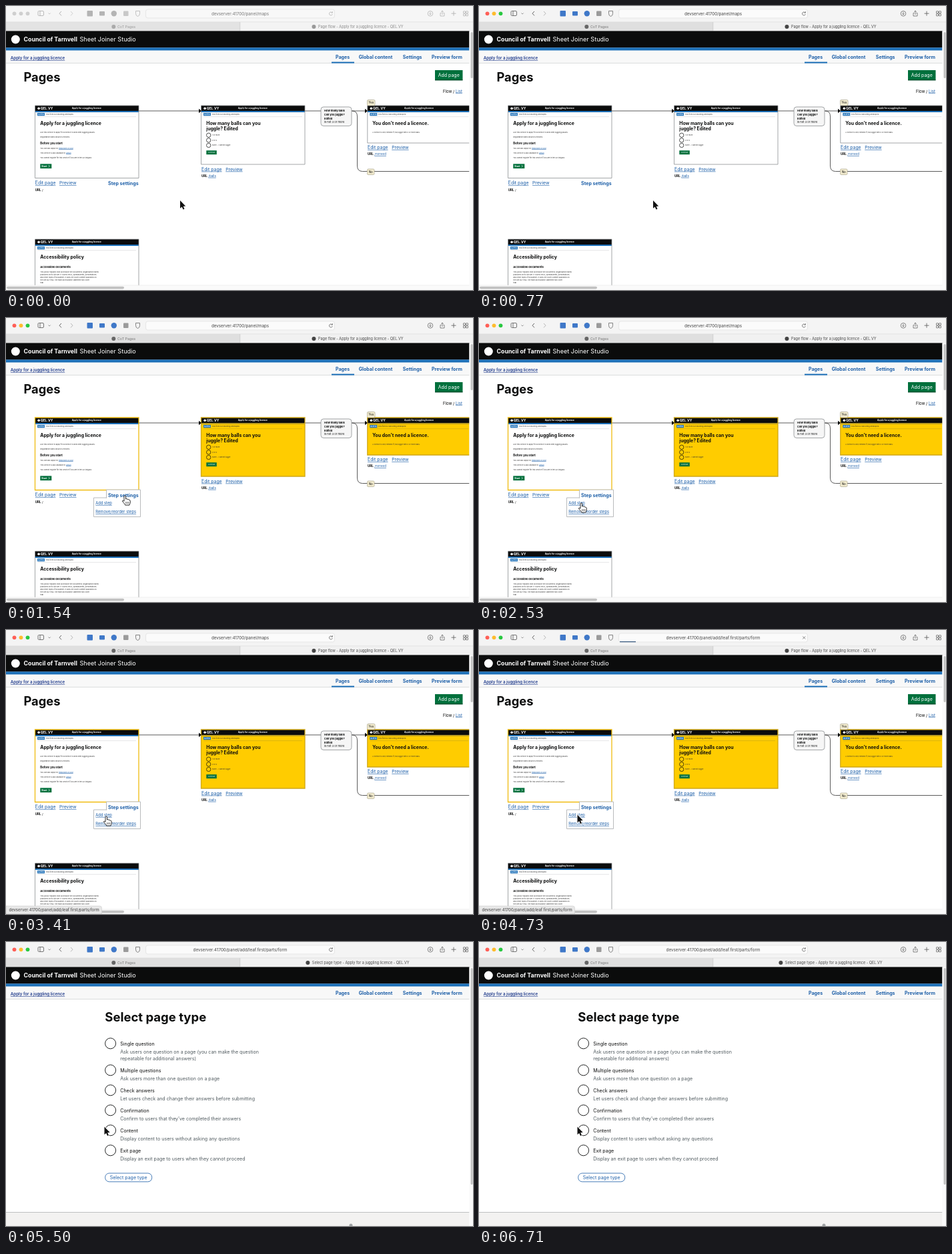
Write an HTML page with a canvas that moves like this. It is 700x425 px and loops after 8 s.

```html
<!DOCTYPE html>
<html lang="en">
<head>
<meta charset="utf-8">
<title>Page flow</title>
<style>
html, body { margin: 0; width: 100%; height: 100%; overflow: hidden; background: #fff; }
canvas { display: block; width: 700px; height: 425px; }
</style>
</head>
<body>
<canvas id="stage"></canvas>
<script>
const W = 700, H = 425, LOOP = 8000, STEP = 110, LAST = 6710;
const canvas = document.getElementById('stage');
const ratio = window.devicePixelRatio || 1;
canvas.width = W * ratio;
canvas.height = H * ratio;
const c = canvas.getContext('2d');

const INK = '#0b0c0c', LINK = '#1d5fa8', BLUE = '#1d70b8', GREEN = '#00703c',
      GOLD = '#ffcc00', GREY = '#505a5f', EDGE = '#b1b4b6';
const SERVICE = 'Apply for a juggling licence', BRAND = 'QEL.VY';
const HOST = 'devserver:41700/panel/';
const FLOW_URL = HOST + 'maps', EDIT_URL = HOST + 'add/leaf.first/parts/form';

// Event times in ms
const AT = { focus: 660, hand: 1540, menu: 1540, status: 2640, load: 4400,
             page: 4840, title: 4950, loaded: 5060, barGone: 5280, statusGone: 5500 };

// Pointer path: time, x, y
const POINTER = [
  [0, 261, 291], [990, 261, 291], [1320, 200.5, 268], [1540, 178, 266],
  [1980, 178, 266], [2310, 158, 275], [2530, 153, 277], [2750, 150, 279],
  [3410, 150, 279], [4180, 148, 277], [4290, 147.5, 276.5]
];
// Loading bar: time, right end
const PROGRESS = [[4400, 212], [4730, 235], [4840, 322], [4950, 400], [5060, 491]];

function along(keys, t, i) {
  const n = keys.findIndex(k => k[0] > t);
  if (n < 0) return keys[keys.length - 1][i];
  if (n === 0) return keys[0][i];
  const a = keys[n - 1], b = keys[n];
  return a[i] + (b[i] - a[i]) * (t - a[0]) / (b[0] - a[0]);
}

function rect(x, y, w, h, fill) {
  c.fillStyle = fill;
  c.fillRect(x, y, w, h);
}

function box(x, y, w, h, r, fill, stroke, line = 1) {
  c.beginPath();
  c.roundRect(x, y, w, h, r);
  if (fill) { c.fillStyle = fill; c.fill(); }
  if (stroke) { c.strokeStyle = stroke; c.lineWidth = line; c.stroke(); }
}

function dot(x, y, r, fill, stroke, line = 1) {
  box(x - r, y - r, r * 2, r * 2, r, fill, stroke, line);
}

function path(d, stroke, line = 1) {
  c.strokeStyle = stroke;
  c.lineWidth = line;
  c.stroke(new Path2D(d));
}

// y is the middle of the capitals; returns the width
function text(s, x, y, size, color = INK, weight = 400, align = 'left') {
  c.font = `${weight} ${size}px Inter, sans-serif`;
  c.textAlign = align;
  c.fillStyle = color;
  c.fillText(s, x, y + size * 0.36);
  return c.measureText(s).width;
}

function link(s, x, y, size, weight = 400, color = LINK) {
  const w = text(s, x, y, size, color, weight);
  rect(x, y + size * 0.5, w, 0.6, color);
  return w;
}

function toolbar(t) {
  const on = t >= AT.focus;
  const icon = on ? '#686868' : '#b4b4b4';
  const blue = on ? '#3f78c8' : '#b4b4b4';
  rect(0, 0, W, 24, on ? '#f4f4f4' : '#f6f6f6');
  ['#ff5f57', '#febc2e', '#28c840'].forEach((col, i) =>
    dot(12.5 + i * 10, 11.3, 2.9, on ? col : '#cfcfcf'));

  box(48, 7.5, 8.5, 7, 1.5, null, icon, 0.9);
  path('M51 7.5v7', icon, 0.9);
  path('M63.5 10.5l1.6 1.6 1.6-1.6', icon, 0.7);
  path('M83 8l-3 3.2 3 3.2', icon);
  path('M97 8l3 3.2-3 3.2', on ? '#b8b8b8' : '#d0d0d0');

  box(121.5, 7, 8.5, 8.5, 1, blue);
  box(140, 8, 8, 6.5, 1, blue);
  dot(161.8, 11.3, 4.2, blue);
  box(176, 7.5, 7.5, 7.5, 1, on ? '#9a9a9a' : '#c8c8c8');
  path('M194.5 7.5h6v4q0 3-3 4q-3-1-3-4z', icon, 0.8);

  box(209.5, 5, 283, 13, 3, on ? '#fbfbfb' : '#f8f8f8', '#dedede', 0.7);
  text(t < AT.load ? FLOW_URL : EDIT_URL, 351, 11.7, 6.25, on ? '#444' : '#777', 400, 'center');
  if (t >= AT.load && t < AT.loaded) {
    path('M485.2 9.5l4 4m0-4l-4 4', '#666', 0.8);
  } else {
    path('M489 10a2.5 2.5 0 1 0 .4 2.2M489.4 8.2v2h-2', icon, 0.8);
  }
  if (t >= AT.load && t < AT.barGone) {
    rect(211, 17, along(PROGRESS, t, 1) - 211, 1.2, '#34557c');
  }

  dot(636, 11.3, 3.8, null, icon, 0.8);
  path('M636 9v4m-1.6-1.6l1.6 1.6 1.6-1.6', icon, 0.8);
  path('M652.5 10.5h-1.5v4.5h6v-4.5h-1.5M654 13V7m-1.7 1.7L654 7l1.7 1.7', icon, 0.8);
  path('M667.5 11.2h7M671 7.7v7', icon, 0.9);
  for (const x of [685.5, 689.5]) for (const y of [7.8, 11.8]) box(x, y, 3, 3, 0.4, null, icon, 0.8);

  rect(0, 24, W, 14, on ? '#f1f1f1' : '#f3f3f3');
  rect(0, 24, 351, 13.5, on ? '#dfdfdf' : '#e3e3e3');
  rect(0, 23.6, W, 0.6, '#d8d8d8');
  rect(350.5, 24, 0.7, 13, '#cacaca');
  const ink = on ? '#484848' : '#8a8a8a';
  dot(161.3, 31, 3, on ? '#666' : '#aaa');
  text('CoT Pages', 167, 31, 5.3, on ? '#777' : '#999');
  const tail = ` - ${SERVICE} - ${BRAND}`;
  const title = t < AT.page ? 'Page flow' + tail : t < AT.title ? EDIT_URL : 'Select page type' + tail;
  const w = text(title, 531.7, 31, 5.5, ink, 400, 'center');
  dot(531.7 - w / 2 - 6.5, 31, 3, on ? '#444' : '#999');
}

function banner(onFlow) {
  rect(0, 37.4, 694.5, 25, INK);
  rect(0, 62.3, 694.5, 4.4, BLUE);
  dot(14.3, 50, 6.5, '#fff');
  text('Council of Tarnvell', 26.5, 50, 8.8, '#fff', 700);
  text('Sheet Joiner Studio', 110.5, 50, 9.1, '#fff');
  rect(0, 66.7, 694.5, 18.6, '#f8f8f8');
  rect(0, 85, 694.5, 0.8, '#d4d6d8');
  link(SERVICE, 6.8, 78, 6.2, 600, '#203c8c');
  [['Pages', 494], ['Global content', 528.7], ['Settings', 594.8], ['Preview form', 638]]
    .forEach(([s, x]) => text(s, x, 76, 7.1, LINK, 700));
  if (onFlow) rect(488, 83.6, 34, 2, BLUE);
}

function thumb(x, y, h, gold, outline) {
  const w = 155.5;
  rect(x, y, w, h, gold ? GOLD : '#fff');
  rect(x, y, w, 8, INK);
  rect(x, y + 8, w, 2, gold ? '#b99b20' : BLUE);
  dot(x + 5.6, y + 4.2, 1.8, '#fff');
  text(BRAND, x + 8.2, y + 4.2, 5, '#fff', 700);
  text(SERVICE, x + 55.3, y + 4.2, 3.3, '#fff', 700);
  rect(x + 3.5, y + 11, 11, 4.2, BLUE);
  text('ALPHA', x + 9, y + 13.1, 2.7, '#fff', 700, 'center');
  text('This form is now being developed', x + 16, y + 13.1, 2.6, '#333');
  rect(x + 4, y + 16.6, w - 8, 0.5, gold ? '#b99b20' : '#c8cacc');
  box(x, y, w, h, 0, null, outline ? '#f0bc10' : gold ? '#d0a818' : '#8d9194', outline || gold ? 1.3 : 0.8);
}

const heading = (s, x, y) => text(s, x, y, 6.9, INK, 700);
const small = (s, x, y) => text(s, x, y, 2.6, '#333');

function caption(x, y, url) {
  link('Edit page', x, y, 6.9);
  link('Preview', x + 36.2, y, 6.8);
  const w = text('URL', x, y + 10.3, 4.5, INK, 700);
  if (url) link(url, x + w + 1.5, y + 10.3, 4.5);
  else text('/', x + w + 1.5, y + 10.3, 4.5);
}

function arrowHead(x, y) {
  c.fillStyle = INK;
  c.fill(new Path2D(`M${x} ${y}l-4-3.2v6.4z`));
}

function tag(s, y, w) {
  box(541.5, y, w, 8.4, 1.5, '#f6efd2', '#a8a28c', 0.7);
  text(s, 541.5 + w / 2, y + 4.2, 4.6, INK, 400, 'center');
}

function startThumb(lit) {
  const x = 51.3;
  thumb(43.5, 149, 108.5, false, lit);
  heading(SERVICE, x, 176);
  small('Use this service to apply for a licence to work with juggling passes.', x, 189.3);
  small('Registration takes around 5 minutes.', x, 196.3);
  text('Before you start', x, 205, 4.3, INK, 700);
  link('telephone or post', x + 1 + small('You can also apply by', x, 213), 213, 2.6);
  link('Welsh', x + 1 + small('This service is also available in', x, 220), 220, 2.6);
  small('You cannot register for this service if you are in the UK illegally.', x, 227);
  rect(x, 236.3, 17, 6.8, GREEN);
  text('Start', 53.3, 239.6, 3.4, '#fff', 700);
  path('M63.8 238l1.5 1.7-1.5 1.7', '#fff', 0.7);
  caption(43.8, 265, '');
}

function flowPage(t) {
  const lit = t >= AT.menu;
  c.save();
  c.beginPath();
  c.rect(0, 38, 694.5, 380);
  c.clip();
  text('Pages', 26.5, 106, 18.3, INK, 700);
  rect(643, 96, 41.5, 15.2, GREEN);
  rect(643, 110.4, 41.5, 0.9, '#003d21');
  text('Add page', 663.7, 103.5, 7, '#fff', 400, 'center');
  const w = text('Flow / ', 655, 127.5, 6);
  link('List', 655 + w, 127.5, 6);

  path('M199 157H290M448 157H472M518 157H538M518.5 157Q526.5 157 526.5 165V239Q526.5 247.5 534.5 247.5H695', '#333', 0.8);
  startThumb(lit);

  thumb(292.5, 149, 88, lit);
  heading('How many balls can you', 300.3, 176);
  heading('juggle? Edited', 300.3, 184);
  ['1 or more', '2 or 3', 'None - I cannot juggle'].forEach((s, i) => {
    const y = 193.3 + i * 7.6;
    dot(303.7, y, 3.2, lit ? null : '#fff', INK, 0.7);
    small(s, 309, y);
  });
  rect(300.3, 216.2, 15.5, 6, GREEN);
  text('Continue', 308, 219.1, 2.5, '#fff', 400, 'center');
  caption(293, 244.2, '/balls');

  box(472, 151, 46, 28.5, 4, '#f6f6f6', '#8d9194', 0.8);
  ['How many balls', 'can you juggle?', 'Edited'].forEach((s, i) =>
    text(s, 477, 157 + i * 5.7, 4, INK, 700));
  text('is not 3 or more', 477, 174, 4.1);

  thumb(541.8, 149, 56, lit);
  heading("You don't need a licence.", 549.3, 176);
  small('A licence is only needed if you juggle with 3 or more balls.', 549.3, 189.3);
  caption(542, 211.5, '/noneed');
  arrowHead(293, 157);
  arrowHead(542, 157);
  tag('Yes', 140.5, 11.5);
  tag('No', 244, 10.5);

  thumb(43.5, 349, 108, false);
  heading('Accessibility policy', 51.3, 376);
  text('Accessible documents', 51.3, 390.3, 4.1, INK, 700);
  ['This policy explains how accessible the documents (organisation name)',
   'publishes on its site are. It covers PDFs, spreadsheets, presentations',
   'and other types of document. It does not cover content published on',
   'the site as HTML: the main accessibility statement will cover',
   'that.'].forEach((s, i) => small(s, 51.3, 398.3 + i * 4));

  if (lit) {
    box(131.5, 269, 70, 28.5, 0, '#fff', EDGE, 0.9);
    box(150.5, 257, 51, 12.3, 0, '#fff', EDGE, 0.9);
    rect(151, 268, 50, 2, '#fff');
    link('Add step', 134.3, 277, 5.8);
    link('Remove/reorder steps', 134.3, 290, 5.8);
  }
  text('Step settings', 153, 265, 7.1, LINK, 700);
  c.restore();

  rect(0, 418, W, 7, '#fafafa');
  rect(0, 417.7, W, 0.6, '#e4e4e4');
  box(1, 419.8, 176, 3.6, 1.8, '#c1c1c1');
}

const OPTIONS = [
  [152, 'Single question', 'Ask users one question on a page (you can make the question', 'repeatable for additional answers)'],
  [192, 'Multiple questions', 'Ask users more than one question on a page'],
  [222, 'Check answers', 'Let users check and change their answers before submitting'],
  [252, 'Confirmation', 'Confirm to users that they’ve completed their answers'],
  [282, 'Content', 'Display content to users without asking any questions'],
  [312, 'Exit page', 'Display an exit page to users when they cannot proceed']
];

function typePage() {
  text('Select page type', 148.3, 112.5, 18.5, INK, 700);
  for (const [y, name, ...hints] of OPTIONS) {
    dot(156.6, y - 0.2, 8, '#fff', INK, 0.9);
    text(name, 171.2, y + 0.2, 7.1);
    hints.forEach((s, i) => text(s, 171.2, y + 12.4 + i * 10, 7.07, GREY));
  }
  box(148.7, 346, 70, 12.8, 6, '#fff', LINK, 0.8);
  text('Select page type', 183.7, 352.6, 7, LINK, 400, 'center');
  rect(0, 404, 694.5, 21, '#f3f2f1');
  rect(0, 404, 694.5, 0.8, EDGE);
  dot(517, 424, 2.5, '#a0a3a5');
}

function status() {
  box(0, 413, 143.5, 12, [0, 3, 0, 0], '#e7e7e7', '#cfcfcf', 0.6);
  text(EDIT_URL, 4.5, 418.8, 5.9, '#555', 500);
}

const ARROW = new Path2D('M0 0V11.8L2.7 9.4 4.5 13.6 6.5 12.7 4.7 8.7 8.2 8.4Z');
const HAND = new Path2D('M-1 1.2C-1-.6 1.6-.6 1.6 1.2V5C2.5 4.2 4 4.5 4.2 5.6 5 5 6.2 5.3 6.4 6.3' +
  ' 7.4 6 8.2 6.6 8.2 7.6V10C8.2 12 7 12.6 7 14H.6C.4 12-3 9.6-3.6 8-3.6 7-2.2 6.8-1 8.2Z');

function pointer(t) {
  const hand = t >= AT.hand && t < AT.load;
  c.save();
  c.translate(along(POINTER, t, 1), along(POINTER, t, 2));
  c.lineJoin = 'round';
  c.strokeStyle = hand ? '#111' : '#fff';
  c.lineWidth = hand ? 0.9 : 1.5;
  c.fillStyle = hand ? '#fff' : '#111';
  if (hand) {
    c.fill(HAND);
    c.stroke(HAND);
    path('M1.7 9v3M3.7 9v3M5.7 9v3', '#111', 0.6);
  } else {
    c.stroke(ARROW);
    c.fill(ARROW);
  }
  c.restore();
}

function draw(t) {
  const onFlow = t < AT.page;
  c.setTransform(ratio, 0, 0, ratio, 0, 0);
  rect(0, 0, W, H, '#fff');
  toolbar(t);
  banner(onFlow);
  if (onFlow) flowPage(t);
  else typePage();
  rect(694.5, 38, 5.5, 387, '#fafafa');
  box(696.6, 39, 3, onFlow ? 69 : 324, 1.5, '#c1c1c1');
  if (t >= AT.status && t < AT.statusGone) status();
  pointer(t);
}

function tick() {
  const t = performance.now() % LOOP;
  draw(Math.min(Math.floor(t / STEP) * STEP, LAST));
  requestAnimationFrame(tick);
}
tick();
</script>
</body>
</html>
```
